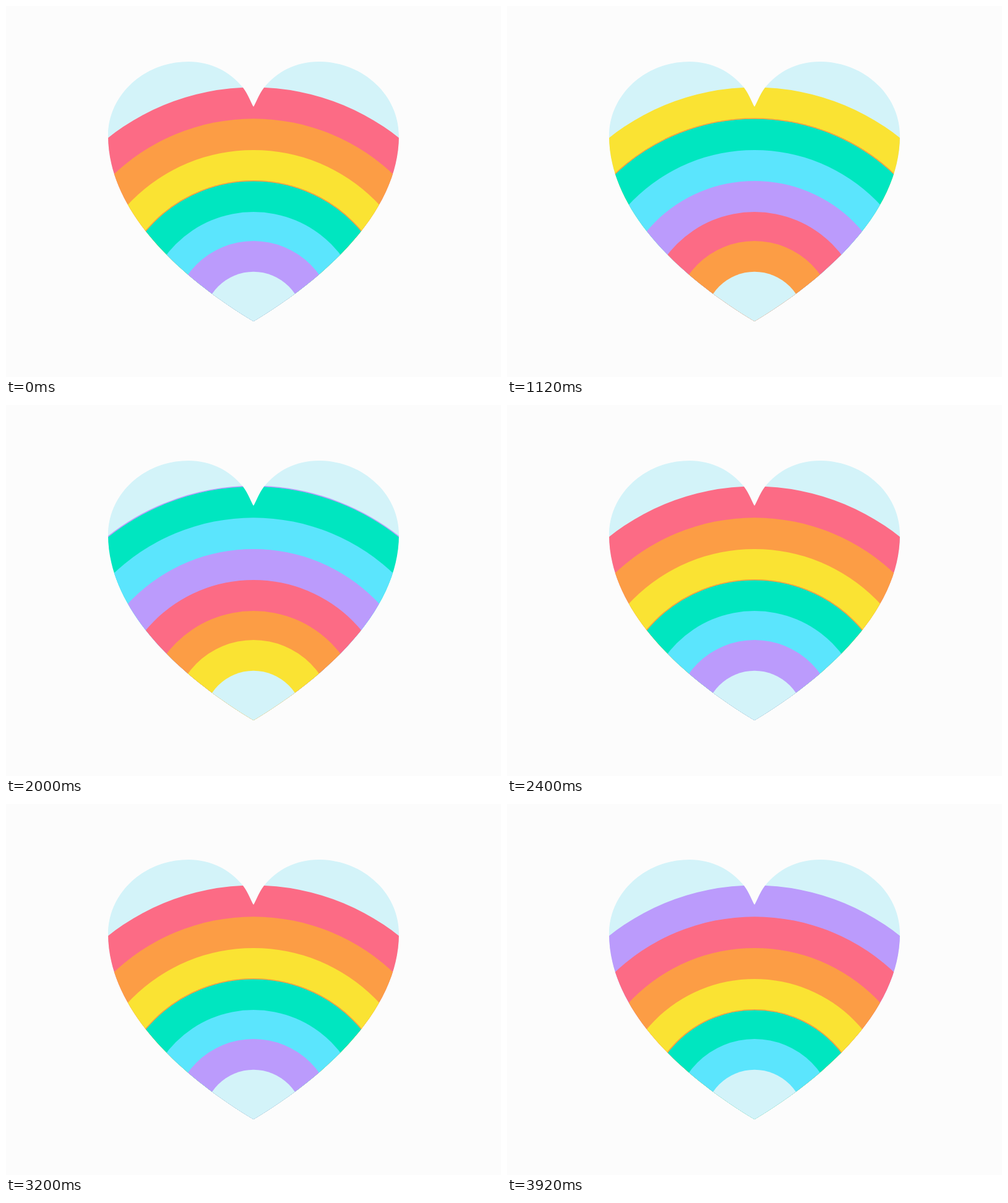
Animation, 800 px wide and 600 px high, one loop 4000 ms. Source, as an HTML page:

```html
<!DOCTYPE html>
<html lang="en">
<head>
<meta charset="utf-8">
<title>Rainbow heart</title>
<style>
  html, body { margin: 0; width: 100%; height: 100%; overflow: hidden; background: #fcfcfc; }
  svg { display: block; width: 100vw; height: 100vh; }
</style>
</head>
<body>
<svg viewBox="0 0 800 600">
  <defs>
    <clipPath id="heart">
      <path d="M400 163 C396 157 392 144 383 132 C362 106 331 90 295 90
               C223 90 165 144 165 210 C165 320 261 426 400 510
               C539 426 635 320 635 210 C635 144 577 90 505 90
               C469 90 438 106 417 132 C408 144 404 157 400 163 Z"/>
    </clipPath>
  </defs>
  <g id="art" clip-path="url(#heart)">
    <rect width="800" height="600" fill="#d3f3f9"/>
  </g>
</svg>
<script>
  const PALE = '#d3f3f9';
  const COLORS = ['#fc6b85', '#fc9d45', '#fae333', '#00e6c0', '#5be5fd', '#bb9bfc'];
  const [ORANGE, GREEN, PURPLE] = [1, 3, 5];
  const RADII = [379, 328.2, 277.6, 227.5, 177.4, 130.5];
  const INNER = 80.7;
  const STEPS = [0, 160, 320, 400, 560, 720];
  const CYCLE = 800;

  const art = document.getElementById('art');

  function addCircle(r, fill) {
    const c = document.createElementNS('http://www.w3.org/2000/svg', 'circle');
    c.setAttribute('cx', 400);
    c.setAttribute('cy', 510.5);
    c.setAttribute('r', r);
    c.setAttribute('fill', fill);
    art.appendChild(c);
    return c;
  }

  const bands = RADII.map(r => addCircle(r, PALE));
  addCircle(INNER, PALE);
  const rim = addCircle(0, 'none');
  rim.setAttribute('stroke-width', 1.5);

  function draw(ms) {
    const t = ms % CYCLE;
    const shift = STEPS.filter(s => s <= t).length - 1;
    bands.forEach((band, i) => band.setAttribute('fill', COLORS[(i + shift) % 6]));

    // Thin line along the outer edge of the green band
    const green = (GREEN - shift + 6) % 6;
    rim.setAttribute('r', RADII[green] + 0.3);
    rim.setAttribute('stroke', COLORS[green ? ORANGE : PURPLE]);
  }

  const start = performance.now();
  function tick() {
    draw(performance.now() - start);
    requestAnimationFrame(tick);
  }
  tick();
</script>
</body>
</html>
```
